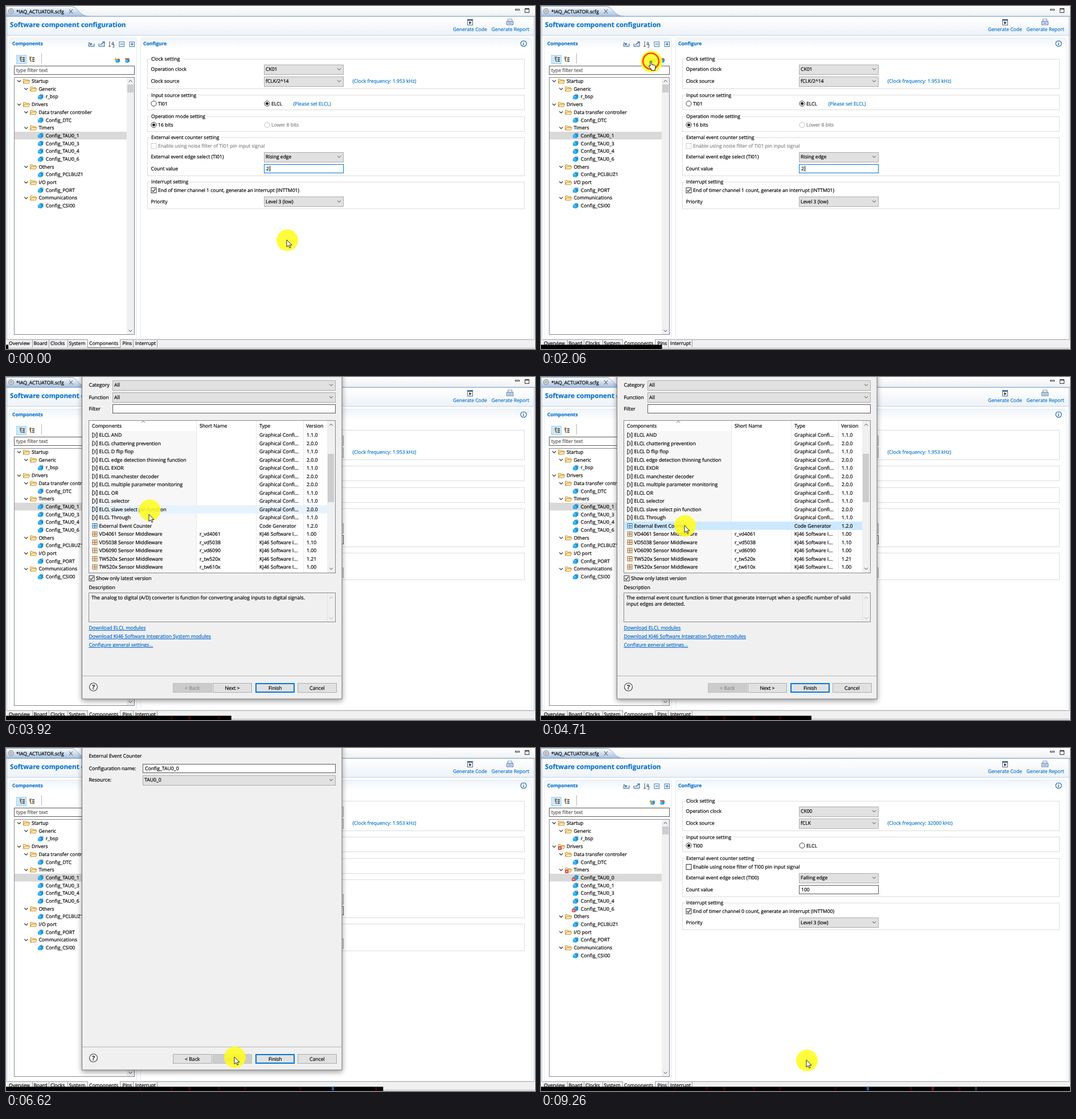
These frames come from a looping animation (929x603 px, 9.29 s). An HTML page:

```html
<!DOCTYPE html>
<html lang="en">
<head>
<meta charset="utf-8">
<title>Software component configuration</title>
<style>
  html, body { margin: 0; width: 100%; height: 100%; overflow: hidden; background: #fff; }
  svg { display: block; width: 100vw; height: 100vh; }
  text { font: 8.55px "Open Sans", "Noto Sans", sans-serif; text-rendering: geometricPrecision; white-space: pre; stroke-width: .2px; }
  #dialog text { font-size: 8.68px; }
  #dialog .help { font-size: 11px; font-weight: 700; }
  .bold { font-weight: 700; font-size: 8.5px; }
  .title { font-weight: 700; font-size: 11.66px; }
  .shadow { filter: drop-shadow(0 3px 5px #0006); }
</style>
</head>
<body>
<svg id="stage" viewBox="0 0 929 603" preserveAspectRatio="none"></svg>
<script>
const LOOP = 9290, BLUE = '#0b74cc', EDGE = '#5a5a5a', ROW = 14.48;

// Drawing helpers
const text = (x, y, s, fill = '#000', more = '') =>
  `<text x="${x}" y="${y + 3.1}" fill="${fill}" stroke="${fill}" ${more}>${s.replace(/</g, '&lt;')}</text>`;
const rect = (x, y, w, h, fill = 'none', stroke = 'none', more = '') =>
  `<rect x="${x}" y="${y}" width="${w}" height="${h}" fill="${fill}" stroke="${stroke}" ${more}/>`;
const path = (d, stroke = '#000', fill = 'none', width = 1) =>
  `<path d="${d}" stroke="${stroke}" fill="${fill}" stroke-width="${width}"/>`;
const disc = (x, y, r, fill, stroke = 'none', width = 1) =>
  `<circle cx="${x}" cy="${y}" r="${r}" fill="${fill}" stroke="${stroke}" stroke-width="${width}"/>`;
const at = (x, y, body, scale = 1) => `<g transform="translate(${x} ${y}) scale(${scale})">${body}</g>`;
const group = (id, body = '') => `<g id="${id}">${body}</g>`;
const chevron = (x, y, dir = 1, color = '#444', width = 1) =>
  path(`M${x - 3} ${y - 1.5 * dir}l3 ${3 * dir} 3 ${-3 * dir}`, color, 'none', width);

// Controls
const combo = (x, y, w, s) => rect(x + .5, Math.round(y - 8.5) + .5, w, 17, '#e1e1e1', '#adadad') +
  text(x + 3, y, s) + chevron(x + w - 7, y);
const field = (x, y, w, s, stroke = EDGE) =>
  rect(x + .5, Math.round(y - 8) + .5, w, 15, '#fff', stroke) + text(x + 4, y, s);
const radio = (x, y, s, on, off) => disc(x, y, 4.6, '#fff', off ? '#bbb' : '#333') +
  (on ? disc(x, y, 2.5, '#222') : '') + text(x + 7.5, y, s, off ? '#838383' : '#000');
const check = (x, y, s, on, off) => rect(x - 4.5, y - 4.5, 9, 9, '#fff', off ? '#ccc' : '#333') +
  (on ? path(`M${x - 3} ${y}l2 2.4 4-5`, '#111', 'none', 1.1) : '') +
  text(x + 7.5, y, s, off ? '#838383' : '#000');
const fieldset = (y, h, s, width) => rect(248.5, Math.floor(y) + .5, 662, h, 'none', '#dcdcdc') +
  rect(253, y - 4, width, 8, '#fff') + text(255, y, s);

// Icons
const folder = path('M-5.5 4V-3.5h3.6l1 1.4h5V0M-5.5 4l2-4.4H6L4 4z', '#c58a2b', '#ffe9b0', .9);
const cube = path('M-4-1.5L0-4 5-3 2-1zM5-3V2L1 5V-1z', 'none', '#1690d8') +
  path('M-4.5-1L1.5-.6V5L-4.5 4z', 'none', '#35b0ee') + path('M0-4.5h4l1 1.5', '#9a9a9a', 'none', .8);
const error = rect(-6, 0, 6, 6, '#d93636') + path('M-4.6 1.4l3.2 3.2M-1.4 1.4l-3.2 3.2', '#fff');
const gridIcon = c => rect(-4, -4, 8, 8, '#e8f3fb', c) + path('M-4 0H4M0-4V4', c, 'none', 1.2);
const logicIcon = path('M-2-4h-2v8h2M2-4h2v8H2', '#222', 'none', 1.1) + path('M-2-2.5h1.5l2 2.5-2 2.5H-2M1.5-2.5L-.5 0l2 2.5', '#333');
const typeIcon = { C: gridIcon('#2e79b8'), S: gridIcon('#b26a24'), G: logicIcon };
const treeIcon = path('M-4-4h4M-4-1h3M-2-4v7M-2 3h2', '#7a5a17', 'none', 1.3) +
  path('M1-3h4M1 0h4M1 3h4', '#333', 'none', 1.6);
const tray = d => path('M-5-1V4H5V-1', '#38648f', '#dbe8f4') + path(d, '#2f5d93', 'none', 1.1);
const box = inner => rect(-4, -4, 8.5, 8.5, '#eef6fd', '#4c7fae') + path(inner, '#24598d');

function frame() {
  let s = rect(0, 0, 929, 603, '#fff') + rect(0, 0, 929, 18, 'url(#strip)') +
    path('M0 18V.5H113C127 .5 127 18 146 18z', '#8ba5c6', 'url(#tab)') +
    rect(0, 17.5, 929, 2, '#99b4d1') + rect(1, 19, 927, 33, 'url(#head)') +
    rect(1, 51, 927, 1, '#c3d3e6') + path('M1.5 19V601M927.5 19V601', '#a9b9cc') +
    disc(9, 9, 4.3, '#e5e5e5', '#777') + disc(9, 9, 1.6, '#fff', '#777') +
    text(18, 9.5, '*IAQ_ACTUATOR.scfg') + path('M111 6l6 7M117 6l-6 7', '#444') +
    rect(894.5, 5.5, 7, 2, '#fff', '#444') + rect(911.5, 4.5, 7, 7, '#fff', '#333') + rect(911, 4, 8, 2, '#333') +
    text(7, 34, 'Software component configuration', BLUE, 'class="title"') +
    text(785, 41, 'Generate Code', BLUE) + text(852.5, 41, 'Generate Report', BLUE) +
    at(815, 28, rect(-4.5, -4.5, 9, 10, '#f6f6f6', '#667') + path('M-5-3H5', '#3975b5', 'none', 2) + path('M-1.5-1v5l4-2.5z', 'none', '#222')) +
    at(885, 28, rect(-3.5, -5, 7, 4, '#fff', '#7391b5') + rect(-5.5, -1, 11, 6, '#d6e2f2', '#5879a8') + path('M-3 2H3', '#5879a8'));
  s += rect(5.5, 56.5, 224, 529, 'none', '#e3ebf4', 'rx="3"') + rect(6, 57, 223, 18, 'url(#section)') +
    rect(236.5, 56.5, 686, 529, 'none', '#e3ebf4', 'rx="3"') + rect(237, 57, 685, 18, 'url(#section)') +
    text(11, 66, 'Components', BLUE, 'class="bold"') + text(241, 66, 'Configure', BLUE, 'class="bold"') +
    disc(909, 66, 5, '#fff', '#2468a6', 1.2) + path('M909 65v4M909 62.5v1.3', '#2468a6', 'none', 1.4);
  s += at(150, 67, tray('M-5-3L0 1M0-2V1H-3')) + at(168, 67, tray('M-2 1L5-4M1-4H5V-1')) +
    at(185, 67, path('M-3-5V5M-5 3l2 2 2-2', '#555') + text(0, -2, 'a', '#357') + text(2, 3, 'z', '#357')) +
    at(203, 67, box('M-2 0H3')) + at(221, 67, box('M-2 0H3M.3-2.5V3')) +
    rect(18.5, 86.5, 17, 15, '#cce8ff', '#99d1ff') + at(28, 94, treeIcon) + at(45, 94, treeIcon) +
    path('M62.5 83V101', '#b5b5b5') +
    at(196, 96, cube + path('M-4-6V1M-7-2.5H0', '#d79a16', 'none', 2), .8) +
    at(213, 96, cube + path('M-5-4H4', '#e05624', 'none', 2.6), .8);
  s += group('filter', field(14, 113, 211, '')) + text(18, 113, 'type filter text', '#555') +
    rect(14.5, 125.5, 211, 452, '#fff', '#828790') + rect(212, 126, 13, 451, '#f0f0f0') +
    rect(213, 138, 11, 14, '#cdcdcd') + chevron(218.5, 132, -1) + chevron(218.5, 571);
  s += rect(1, 586, 927, 15, '#f0f0f0') + path('M1 586.5H928M1 601.5H928', '#aaa') + rect(143.5, 585, 57, 14, '#fff') +
    path('M46.5 587V600M75.5 587V600M108.5 587V600M143.5 586V600M200.5 586V600M223.5 587V600M265.5 587V600M143 600.5H201', '#999');
  [['Overview', 5], ['Board', 48.5], ['Clocks', 78], ['System', 110.5], ['Components', 146], ['Pins', 204.5], ['Interrupt', 227]]
    .forEach(([name, x]) => s += text(x, 593, name));
  return s;
}

function tree(timers, selected, failed = []) {
  const rows = ['0Startup', '1Generic', '2r_bsp', '0Drivers', '1Data transfer controller', '2Config_DTC', '1Timers',
    ...timers.map(n => '2Config_TAU0_' + n), '1Others', '2Config_PCLBUZ1', '1I/O port', '2Config_PORT',
    '1Communications', '2Config_CSI00'];
  return rows.map((row, i) => {
    const depth = +row[0], name = row.slice(1), y = 132 + i * 13.69, leaf = depth === 2;
    return (name === selected ? rect(15, y - 6.8, 197, 13.6, '#d9d9d9') : '') +
      (leaf ? '' : chevron(23 + depth * 12.3, y, 1, '#333', 1.2)) +
      at(36 + depth * 12.2, y, (leaf ? cube : folder) + (failed.includes(name) ? error : '')) +
      text(45 + depth * 12.4, y, name);
  }).join('');
}

function config(ch, { clock, source, freq, edge, count, border }) {
  const one = ch === 1, up = one ? 0 : -37;
  let s = fieldset(93, 52, 'Clock setting', 57) + text(254.5, 111, 'Operation clock') + combo(453, 111, 139, clock) +
    text(254.5, 132, 'Clock source') + combo(453, 132, 139, source) + text(608.5, 132, `(Clock frequency: ${freq} kHz)`, BLUE) +
    fieldset(156.5, 26, 'Input source setting', 84) + radio(259.5, 171.5, 'TI0' + ch, !one) + radio(458.5, 171.5, 'ELCL', one);
  if (one) s += text(504.5, 171.5, '(Please set ELCL)', BLUE) + fieldset(194, 26, 'Operation mode setting', 100) +
    radio(259.5, 209, '16 bits', true) + radio(458.5, 209, 'Lower 8 bits', false, true);
  return s + at(0, up, fieldset(231, 67, 'External event counter setting', 124) +
    check(259.5, 246, `Enable using noise filter of TI0${ch} pin input signal`, false, one) +
    text(254.5, 265, `External event edge select (TI0${ch})`) + combo(453, 265, 139, edge) +
    text(254.5, 285.5, 'Count value') + field(453, 285.5, 139, count, border) +
    (one ? path('M463.5 281V291') : '') +
    fieldset(309, 47, 'Interrupt setting', 69) +
    check(259.5, 324, `End of timer channel ${ch} count, generate an interrupt (INTTM0${ch})`, true) +
    text(254.5, 343.5, 'Priority') + combo(453, 343.5, 139, 'Level 3 (low)'));
}

const typeName = { C: 'Code Generator', S: 'KJ46 Software I...', G: 'Graphical Confi...' };
const components = `A/D Converter||C|1.1.0
Board Support Packages. - v1.30|r_bsp|S|1.30
Capacitive Sensing Unit driver.|r_ctsu|S|1.20
Clock Output /Buzzer Output Controller||C|1.2.0
Comparator||C|1.2.0
D/A Converter||C|1.2.0
Data Transfer Controller||C|1.1.1
Delay Counter||C|1.2.0
Divider Function||C|1.2.0
ELCL AND||G|1.1.0
ELCL chattering prevention||G|2.0.0
ELCL D flip flop||G|1.1.0
ELCL edge detection thinning function||G|2.0.0
ELCL EXOR||G|1.1.0
ELCL manchester decoder||G|2.0.0
ELCL multiple parameter monitoring||G|2.0.0
ELCL OR||G|1.1.0
ELCL selector||G|1.1.0
ELCL slave select pin function||G|2.0.0
ELCL Through||G|1.1.0
External Event Counter||C|1.2.0
VD4061 Sensor Middleware|r_vd4061|S|1.00
VD5038 Sensor Middleware|r_vd5038|S|1.10
VD6090 Sensor Middleware|r_vd6090|S|1.00
TW520x Sensor Middleware|r_tw520x|S|1.21
TW520x Sensor Middleware|r_tw610x|S|1.00`.split('\n').map(line => line.split('|'));

const listRows = (offset, selected, hover) => components.slice(offset, offset + 17).map(([name, short, type, version], i) => {
  const y = 102.3 + i * ROW, fill = i + offset === selected ? '#cce8ff' : i === hover ? '#e5f3ff' : '';
  return (fill ? rect(147, y - ROW / 2, 417, ROW, fill) : '') + at(156, y, typeIcon[type]) + text(163.5, y, name) +
    text(340, y, short) + text(445, y, typeName[type]) + text(528, y, version);
}).join('') + rect(565, 90 + offset * 5, 11, 85, '#cdcdcd');

function button(x, s, width, kind) {
  const off = kind === 'off', face = off ? '#ccc' : '#e1e1e1';
  return (kind === 'main' ? rect(x + 1, 539, 67, 15, face, '#0078d7', 'stroke-width="2"')
    : rect(x + .5, 538.5, 68, 16, face, off ? '#bfbfbf' : '#adadad')) +
    text(x + 34.5 - width / 2, 546.5, s, off ? '#888' : '#000');
}
const link = (y, s) => text(145.5, y, s, '#0066cc', 'text-decoration="underline"');

function dialog() {
  const list = text(145.5, 14, 'Category') + combo(187, 14, 391, 'All') + text(145.5, 35.5, 'Function') + combo(187, 35.5, 391, 'All') +
    text(145.5, 56, 'Filter') + field(187, 56, 391, '') +
    rect(145.5, 76.5, 433, 268, '#fff', '#828790') + rect(146, 95, 188, 249, '#f7f7f7') +
    path('M334.5 77V344M439.5 77V344M522.5 77V344', '#e8e8e8') + chevron(241, 79, -1, '#666') +
    text(151, 86, 'Components') + text(340, 86, 'Short Name') + text(445, 86, 'Type') + text(527, 86, 'Version') +
    rect(564, 77, 14, 267, '#f0f0f0') + chevron(571, 84, -1) + chevron(571, 337) + group('rows') +
    check(150.5, 354, 'Show only latest version', true) + text(145.5, 370, 'Description') +
    rect(145.5, 379.5, 433, 51, '#f0f0f0', '#8a8a8a') + path('M564.5 380V430', '#e2e2e2') +
    chevron(571, 388, -1, '#aaa') + chevron(571, 424, 1, '#aaa') +
    group('before', text(150, 388, 'The analog to digital (A/D) converter is function for converting analog inputs to digital signals.')) +
    group('after', text(150, 388, 'The external event count function is timer that generate interrupt when a specific number of valid') +
      text(150, 399, 'input edges are detected.')) +
    link(441, 'Download ELCL modules') + link(456, 'Download KJ46 Software Integration System modules') +
    link(471, 'Configure general settings...') + button(293, '< Back', 27, 'off') + button(363, 'Next >', 26);
  const setup = text(145.5, 14, 'External Event Counter') + text(145.5, 35.5, 'Configuration name:') +
    field(240, 35.5, 338, 'Config_TAU0_0') + text(145.5, 56, 'Resource:') + combo(240, 56, 338, 'TAU0_0');
  return rect(133.5, -20, 456.5, 586, '#f0f0f0', '#777', 'class="shadow"') + path('M134 525.5H590', '#b5b5b5') +
    disc(153.5, 545, 7, '#f7f7f7', '#444', 1.2) + text(150.9, 545.8, '?', '#333', 'class="help"') +
    group('list', list) + group('setup', setup) +
    group('setupButtons', button(293, '< Back', 27) + button(363, 'Next >', 26, 'off')) +
    button(438, 'Finish', 23, 'main') + button(512, 'Cancel', 27);
}

const gradient = (id, from, to) => `<linearGradient id="${id}" x2="0" y2="1"><stop stop-color="${from}"/><stop offset="1" stop-color="${to}"/></linearGradient>`;
const eventOne = { clock: 'CK01', source: 'fCLK/2^14', freq: '1.953', edge: 'Rising edge', count: '2' };
const flecks = [[236, '#200'], [291, '#300'], [322, '#400'], [374, '#300'], [420, '#300'], [517, '#300'],
  [574, '#1a5f9a'], [650, '#400'], [688, '#711'], [735, '#300'], [764, '#234']];
const stage = document.getElementById('stage');
stage.innerHTML = `<defs>${gradient('strip', '#fff', '#eef0f3')}${gradient('tab', '#fff', '#a5bfdf')}${gradient('head', '#fff', '#edf2f8')}${gradient('section', '#f0f5fb', '#fff')}
  <clipPath id="played"><rect id="progress" y="595.5" height="7.5"/></clipPath></defs>` + frame() +
  group('tree1', tree([1, 3, 4, 6], 'Config_TAU0_1')) +
  group('tree2', tree([0, 1, 3, 4, 6], 'Config_TAU0_1')) +
  group('tree3', tree([0, 1, 3, 4, 6], 'Config_TAU0_0', ['Drivers', 'Timers', 'Config_TAU0_0', 'Config_TAU0_6'])) +
  group('config1', config(1, { ...eventOne, border: '#0078d7' })) + group('config2', config(1, eventOne)) +
  group('config3', config(0, { clock: 'CK00', source: 'fCLK', freq: '32000', edge: 'Falling edge', count: '100' })) +
  group('dialog', dialog()) +
  `<g id="halo" opacity=".88">${disc(1, .7, 19, '#fffd20')}</g><circle id="ring" fill="none" stroke="#f2470c" stroke-width="2.6"/>` +
  group('pointer', group('arrow', path('M0 0V12.6l3-2.7 2 4.4 1.9-.8-1.9-4.3h4z', '#111', '#fff', .9)) +
    group('hand', path('M-1.2 9V.9a1.2 1.2 0 0 1 2.4 0V6l5.4 1.2q1.6.4 1.6 2L7.2 14v2.4H.6V14l-4.2-4.4q-.5-1.6 1-1.5z', '#111', '#fff', 1))) +
  `<g clip-path="url(#played)">${rect(0, 595, 929, 8, '#000')}${flecks.map(([x, c]) => rect(x - 2, 596, 4, 6, c)).join('')}</g>`;

const $ = Object.fromEntries([...stage.querySelectorAll('[id]')].map(el => [el.id, el]));
const show = (id, on) => $[id].style.display = on ? '' : 'none';
const move = (id, [x, y]) => $[id].setAttribute('transform', `translate(${x} ${y})`);

// Times in ms
const OPEN = 2350, SELECT = 4350, LEAVE_LIST = 5650, SETUP = 5780, CLOSE = 7570, REFRESH = 8250, HALO_LAG = 15;
const clicks = [1870, 4250, 5450, 7520], scrolls = [3480, 3580, 3690];
const route = [[0, 493, 411], [480, 493, 411], [960, 446, 290], [1600, 193, 97], [2700, 193, 97], [3320, 252, 205],
  [3400, 254, 209], [3860, 254, 209], [3920, 251, 241], [4000, 252, 261], [4900, 252, 261],
  [5385, 401, 543], [6800, 401, 543], [7300, 466, 548.5], [LOOP, 466, 548.5]];
const ticks = [[0, 0], [40, 1], [1000, 24], [1970, 48], [2930, 71], [3870, 93], [4830, 116], [5770, 138], [6700, 160],
  [7670, 183], [8600, 206], [9260, 222], [LOOP, 222]];

const span = (table, t) => Math.min(Math.max(table.findIndex(k => k[0] > t) - 1, 0), table.length - 2);

// Hermite curve through the route, at rest at every pause
function slope(i, axis) {
  const a = route[i - 1], b = route[i], c = route[i + 1];
  if (!a || !c || (a[1] === b[1] && a[2] === b[2]) || (b[1] === c[1] && b[2] === c[2])) return 0;
  return (c[axis] - a[axis]) / (c[0] - a[0]);
}
function position(t) {
  const i = span(route, t), a = route[i], b = route[i + 1], d = b[0] - a[0], u = Math.min((t - a[0]) / d, 1);
  return [1, 2].map(k => {
    const ease = u * u * (3 - 2 * u);
    return a[k] + (b[k] - a[k]) * ease + d * u * (1 - u) * ((1 - u) * slope(i, k) - u * slope(i + 1, k));
  });
}
function tick(t) {
  const i = span(ticks, t), [t0, n0] = ticks[i], [t1, n1] = ticks[i + 1];
  return Math.floor(n0 + (n1 - n0) * (t - t0) / (t1 - t0) + .25);
}

let listKey = '';
function draw(t) {
  const tip = position(t), halo = position(Math.max(t - HALO_LAG, 0)), open = t >= OPEN && t < CLOSE;
  show('tree1', t < CLOSE);
  show('tree2', t >= CLOSE && t < REFRESH);
  show('tree3', t >= REFRESH);
  show('config1', t < OPEN);
  show('config2', t >= OPEN && t < REFRESH);
  show('config3', t >= REFRESH);
  show('dialog', open);
  show('list', t < LEAVE_LIST);
  show('setup', t >= SETUP);
  show('setupButtons', t >= LEAVE_LIST);
  show('before', t < SELECT);
  show('after', t >= SELECT);

  const offset = 3 * scrolls.filter(s => t >= s).length, selected = t < SELECT ? 0 : 20;
  const hover = halo[1] > 95 && halo[1] < 343 ? Math.floor((halo[1] - 95) / ROW) : -1;
  const key = [offset, selected, hover].join();
  if (key !== listKey) $.rows.innerHTML = listRows(offset, selected, hover);
  listKey = key;

  const overFilter = !open && tip[0] > 14 && tip[0] < 226 && tip[1] > 105 && tip[1] < 121;
  $.filter.firstChild.setAttribute('stroke', overFilter ? '#171717' : EDGE);

  const hand = t < OPEN && tip[1] < 103;
  show('hand', hand);
  show('arrow', !hand);
  move('pointer', tip);
  move('halo', halo);
  move('ring', halo);
  const click = clicks.find(c => t >= c && t < c + 400);
  show('ring', click !== undefined);
  $.ring.setAttribute('r', click === undefined ? 0 : 14 * Math.sin(Math.PI * (t - click) / 400));
  $.progress.setAttribute('width', (tick(t) + 1) / 223 * 929);
}

const start = performance.now();
function play() {
  draw((performance.now() - start) % LOOP);
  requestAnimationFrame(play);
}
play();
</script>
</body>
</html>
```
